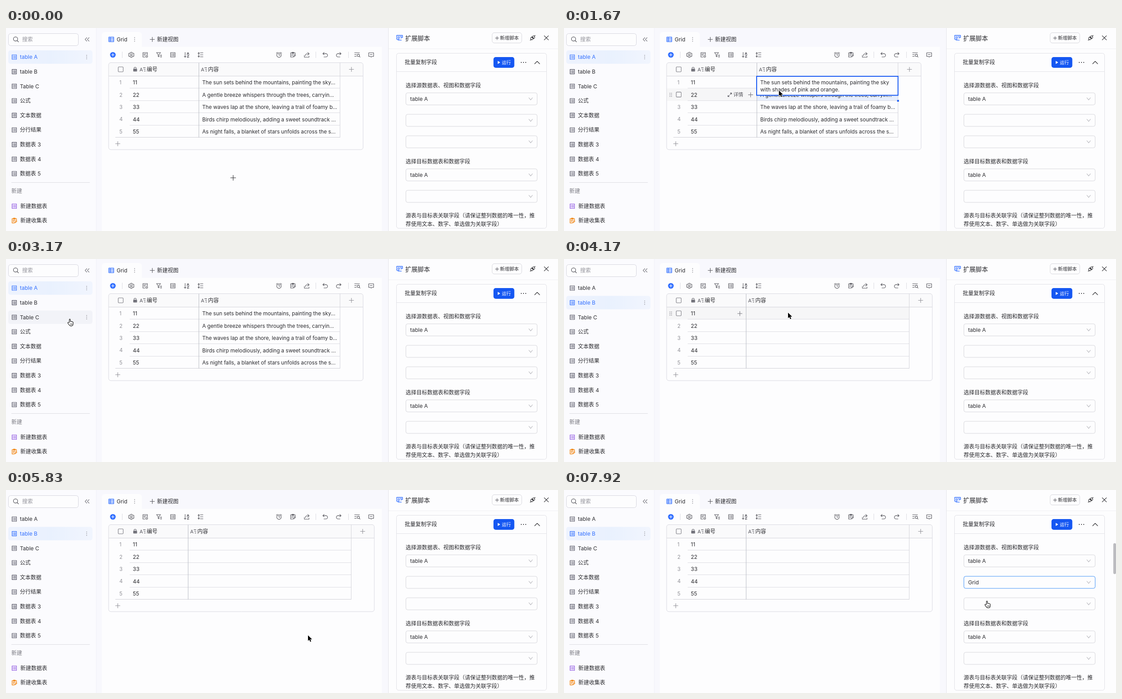
An HTML page with a canvas that plays this animation: 1232 by 454 pixels, repeating every 8000 ms.

```html
<!DOCTYPE html>
<html lang="zh-CN">
<head>
<meta charset="utf-8">
<title>Grid</title>
<style>
html, body { margin: 0; width: 100%; height: 100%; overflow: hidden; background: #fdfdfe; }
canvas { display: block; width: 1232px; height: 454px; }
</style>
</head>
<body>
<canvas id="stage"></canvas>
<script>
const W = 1232, H = 454, LOOP = 8000, STEP = 1000 / 12;
const canvas = document.getElementById('stage');
const ctx = canvas.getContext('2d');
const dpr = window.devicePixelRatio || 1;
canvas.width = W * dpr;
canvas.height = H * dpr;

const FONT = 'Inter, "Noto Sans CJK SC", "Noto Sans CJK", sans-serif';
const INK = '#2b2b2f', GREY = '#8f8f96', MID = '#55555c', LINE = '#dcdce2';
const BLUE = '#3370ff', DEEP = '#1557f2';
const ROW_TOP = 108, ROW_H = 27.4;

const ICONS = {
  list: 'M-5-5h10v10h-10zM-3.2-2.3h1M-.6-2.3h3.8M-3.2 0h1M-.6 0h3.8M-3.2 2.3h1M-.6 2.3h3.8',
  search: 'M4 -.5a4.7 4.7 0 1 1-9.4 0a4.7 4.7 0 1 1 9.4 0M2.8 3l3 3',
  fold: 'M-.5-4l-4 4 4 4M4.5-4l-4 4 4 4',
  grid: 'M-5.5-5h11v10h-11zM-5.5-1.8h11M-5.5 1.6h11M-2-5v10',
  plus: 'M-5 0h10M0-5v10',
  gear: 'M-1.2-5.8h2.4l.6 1.6 1.5.8 1.7-.3 1.1 2-1.1 1.7 1.1 1.7-1.1 2-1.7-.3-1.5.8-.6 1.6h-2.4l-.6-1.6-1.5-.8-1.7.3-1.1-2 1.1-1.7-1.1-1.7 1.1-2 1.7.3 1.5-.8zM2 0a2 2 0 1 1-4 0a2 2 0 1 1 4 0',
  form: 'M5 0v-5h-10v10h5M-3-2.2h6M-3 .4h3M5.5 3.3a2 2 0 1 1-4 0a2 2 0 1 1 4 0',
  filter: 'M-5.5-5h9l-3.5 4.5v5l-2-1v-4zM3 .5h3M3 2.7h3M3 5h3',
  sort: 'M-3.5-5.5v11M-5.5 3.3l2 2.2 2-2.2M.7-.7l2.2-4.8 2.2 4.8M1.4-2.4h3M1 1h4l-4 4.4h4',
  height: 'M-.5-4.5h6M-.5 0h6M-.5 4.5h6M-4-5v10M-5.8-3.2l1.8-1.9 1.8 1.9M-5.8 3.2l1.8 1.9 1.8-1.9',
  alarm: 'M5 .6a5 5 0 1 1-10 0a5 5 0 1 1 10 0M0-2.4v3.2h2.4M-5.8-3.6l2.4-2M5.8-3.6l-2.4-2',
  clip: 'M5-.5v-4h-10v9.5h5M-2-5.8h4v2.2h-4zM-3-1h5M-3 1.5h2.5M1 4.7l.3-1.8 3.2-3.2 1.4 1.4-3.2 3.2z',
  share: 'M2-5.3l3.4 3-3.4 3M5-2.3h-4c-3 0-4 2-4 4M-5.4 1v4.2h10.4v-2.5',
  undo: 'M-2.4-5.4l-3 2.8 3 2.8M-5-2.6h6.5a3.7 3.7 0 0 1 0 7.4h-4.5',
  redo: 'M2.4-5.4l3 2.8-3 2.8M5-2.6h-6.5a3.7 3.7 0 0 0 0 7.4h4.5',
  find: 'M-6-4.5h11M-6-.5h4M-6 3.5h4M5 1.2a2.6 2.6 0 1 1-5.2 0a2.6 2.6 0 1 1 5.2 0M4.3 3.2l2 2',
  comment: 'M-5.5-4.5h11v8h-4l-1.5 1.7-1.5-1.7h-4zM-2.5-.5h5',
  script: 'M-1 3.5h-5.5v-8.500h13v5M-2-2.700l-2 2 2 2M1-2.700l-1.500 4M3-2.700l2 2-2 2M-4 5.700h8',
  plug: 'M-5.500 5.500l2-2M-3.500 3.500c-2.500-2-.5-4 1-5.500l4 4c-1.500 1.500-3 3.500-5 1.500M5.500-5.500l-2 2M3.500-3.500c2.500 2 .5 4-.6 5l-4-4c1.100-1.500 2.600-3 4.600-1M-1 .5l1.600-1.600',
  close: 'M-4.700-4.700l9.400 9.400M4.700-4.700l-9.400 9.400',
  up: 'M-5.500 3l5.500-5.500 5.500 5.500',
  down: 'M-4-2.500l4 4.800 4-4.800',
  expand: 'M1-1l3.500-3.500M1.500-4.500h3v3M-1 1l-3.500 3.500M-4.500 1.500v3h3',
  bars: 'M0-4h5M1.500 0h3.500M2.500 4h2.500'
};
for (const name in ICONS) ICONS[name] = new Path2D(ICONS[name]);

const ARROW = new Path2D('M0 0v12.500l2.900-2.700 2 4.600 2.200-1-2-4.400h4z');
const HAND = new Path2D('M-1.200 7V.6c0-1.700 2.300-1.700 2.300 0v4c.7-.6 2-.4 2.200.4.800-.5 1.900-.2 2.100.6.900-.4 2 .1 2 1.200v3.200c0 3-1.600 4.800-4.600 4.800-2.400 0-3.300-.8-4.300-2.400l-2.900-4c-.9-1.300.7-2.400 1.700-1.500z');
const HAND_LINES = new Path2D('M1.500 9v3.500M3.300 9v3.500M5.100 9v3.500');

const SIDEBAR = ['table A', 'table B', 'Table C', '公式', '文本数据', '分行结果', '数据表 3', '数据表 4', '数据表 5'];
const itemY = i => 65 + 32.6 * i;
const TEXTS = [
  'The sun sets behind the mountains, painting the sky...',
  'A gentle breeze whispers through the trees, carryin...',
  'The waves lap at the shore, leaving a trail of foamy b...',
  'Birds chirp melodiously, adding a sweet soundtrack ...',
  'As night falls, a blanket of stars unfolds across the s...'
];
const TABLE_A = { split: 430, end: 745, right: 797, texts: TEXTS, detail: true };
const TABLE_B = { split: 406, end: 770, right: 822, texts: [], detail: false };

// pointer path: step, x, y
const PATH = [
  [0, 507, 335], [1, 507, 335], [4, 448, 324], [5, 448, 324], [7, 453, 331],
  [13, 482, 110], [18, 482, 112], [25, 470, 252], [26, 470, 252], [29, 468, 293],
  [33, 468, 293], [40, 62, 96], [43, 62, 96], [50, 500, 120], [51, 501, 122],
  [53, 501, 122], [60, 500, 231], [63, 500, 231], [66, 605, 340], [69, 605, 340],
  [70, 674, 325], [79, 968, 209], [85, 968, 209], [89, 925, 240], [93, 925, 240],
  [95, 944, 249]
];

function pointerAt(n) {
  let i = 0;
  while (i < PATH.length - 2 && PATH[i + 1][0] <= n) i++;
  const [n0, x0, y0] = PATH[i], [n1, x1, y1] = PATH[i + 1];
  const p = Math.min(1, (n - n0) / (n1 - n0)), e = p * p * (3 - 2 * p);
  return { x: x0 + (x1 - x0) * e, y: y0 + (y1 - y0) * e };
}

function text(str, x, y, color = INK, size = 12, weight = 400) {
  ctx.font = `${weight} ${size}px ${FONT}`;
  ctx.fillStyle = color;
  ctx.fillText(str, x, y + size * 0.37);
}
function rect(x, y, w, h, color) {
  ctx.fillStyle = color;
  ctx.fillRect(x, y, w, h);
}
function box(x, y, w, h, r, fill, stroke, width = 1) {
  ctx.beginPath();
  ctx.roundRect(x, y, w, h, r);
  if (fill) { ctx.fillStyle = fill; ctx.fill(); }
  if (stroke) { ctx.strokeStyle = stroke; ctx.lineWidth = width; ctx.stroke(); }
}
function icon(name, x, y, color = MID, width = 1.1, scale = 1) {
  ctx.save();
  ctx.translate(x, y);
  ctx.scale(scale, scale);
  ctx.lineJoin = ctx.lineCap = 'round';
  ctx.strokeStyle = color;
  ctx.lineWidth = width / scale;
  ctx.stroke(ICONS[name]);
  ctx.restore();
}
function dots(x, y, dx, dy, color = MID, r = 0.9) {
  ctx.fillStyle = color;
  for (let i = -1; i <= 1; i++) {
    ctx.beginPath();
    ctx.arc(x + i * dx, y + i * dy, r, 0, 7);
    ctx.fill();
  }
}

function drawSidebar(active, hover) {
  rect(0, 0, 201, H, '#fbfbfe');
  box(5.5, 12.5, 156, 27, 5, '#fdfdfe', '#d5d5de');
  icon('search', 22, 25, MID, 1.2);
  text('搜索', 36, 25.500, '#94949c');
  icon('fold', 181, 25.500, '#77777f');
  SIDEBAR.forEach((name, i) => {
    const y = itemY(i), on = i === active;
    if (on) {
      const g = ctx.createLinearGradient(5, 0, 193, 0);
      g.addColorStop(0, '#eef3fe');
      g.addColorStop(0.5, '#e9f1fe');
      g.addColorStop(1, '#f1f5fe');
      box(5, y - 15, 188, 30, 5, g);
    } else if (i === hover) box(5, y - 15, 188, 30, 5, '#f2f3f8');
    icon('list', 18.5, y, on ? BLUE : '#50505f');
    text(name, 31, y, on ? BLUE : INK);
    if (on || i === hover) dots(180, y, 0, 3.8, GREY);
  });
  rect(12, 345, 175, 1, LINE);
  text('新建', 12, 365, '#7a7a82');
  icon('list', 18.500, 398.500, '#8a4fe0');
  text('新建数据表', 32, 398.500);
  icon('clip', 18.500, 431, '#f28a1c', 1.3);
  text('新建收集表', 32, 431);
}

function drawToolbar() {
  rect(201, 0, 652, H, '#f8f8fd');
  rect(214, 42, 625, H - 42, '#fdfdfe');
  box(214, 9, 89, 40, [6, 6, 0, 0], '#fdfdfe');
  icon('grid', 235, 25.500, BLUE, 1.3);
  text('Grid', 247, 25.500, INK);
  dots(287, 25.500, 0, 4, GREY);
  icon('plus', 326.500, 25.500, MID);
  text('新建视图', 337, 25.500, INK);
  ctx.fillStyle = BLUE;
  ctx.beginPath();
  ctx.arc(238.500, 60, 6.3, 0, 7);
  ctx.fill();
  icon('plus', 238.500, 60, '#fff', 1.2, 0.6);
  [259, 691, 764].forEach(x => rect(x, 53, 1, 14, LINE));
  ['gear', 'form', 'filter', 'list', 'sort', 'height'].forEach((name, i) => icon(name, 279.700 + 30.900 * i, 60));
  ['alarm', 'clip', 'share'].forEach((name, i) => icon(name, 609.300 + 31 * i, 60));
  icon('undo', 712.500, 60);
  icon('redo', 742.500, 60);
  icon('find', 784, 60);
  icon('comment', 815, 60);
}

function fieldHead(label, x) {
  text('A', x, 92.500, MID, 11);
  icon('bars', x + 8.500, 92.500, MID, 1.1, 0.9);
  text(label, x + 16, 92.500);
}
function checkbox(y) {
  box(250.500, y - 5.500, 11, 11, 1.500, '#fdfdfe', '#77777f', 1.1);
}

function drawTable(t, hover, selEnd) {
  const { split, end, right } = t, bottom = ROW_TOP + 5 * ROW_H;
  box(229, 77.500, right - 229, 194.500, 5, '#fdfdfe');
  box(229, 77.500, right - 229, 30, [5, 5, 0, 0], '#fafafb');
  if (hover === 5) rect(229, 245, end - 229, 27, '#f6f6f8');

  for (let i = 0; i < 5; i++) {
    const top = ROW_TOP + i * ROW_H, y = top + 14;
    if (hover === i) rect(229, top, end - 229, ROW_H, '#f6f6f7');
    if (selEnd >= i) rect(split + 1, top, end - split - 1, ROW_H, '#e6eefd');
    if (hover === i) {
      for (const x of [236.500, 240]) dots(x, y, 0, 3.5, GREY, 0.95);
      checkbox(y - 0.500);
      icon('plus', split - 13.500, y, '#77777f');
      if (t.detail) {
        icon('expand', 370, y, MID, 1.1, 0.9);
        text('详情', 378, y, MID, 11);
      }
    } else text(String(i + 1), 253, y, GREY, 11.500);
    text(String(i + 1).repeat(2), 283, y, INK);
    if (t.texts[i]) text(t.texts[i], 438, y, INK, 11.7);
    const last = i === 4;
    rect(last ? 244 : 276, Math.round(top + ROW_H) - 1, end - (last ? 244 : 276), 1, last ? '#cfcfd6' : LINE);
  }

  rect(229, 107, right - 229, 1, '#d4d4da');
  rect(split, 78, 1, bottom - 78, '#b9bcc4');
  rect(end, 78, 1, bottom - 78, '#d4d4da');
  box(229, 77.500, right - 229, 194.500, 5, null, '#d8d8e0');
  checkbox(92.500);
  box(284, 91, 8.500, 6.300, 1, '#74747c');
  ctx.strokeStyle = '#74747c';
  ctx.lineWidth = 1.200;
  ctx.beginPath();
  ctx.arc(288.200, 90.500, 2.600, Math.PI, 0);
  ctx.stroke();
  fieldHead('编号', 298);
  fieldHead('内容', split + 5);
  icon('plus', right - 26, 92.500, GREY);
  icon('plus', 249.500, 258.800, GREY);

  if (selEnd >= 0) {
    const lines = t.texts.length ? ['The sun sets behind the mountains, painting the sky', 'with shades of pink and orange.'] : [];
    box(split, 108, end - split + 0.500, lines.length ? 42.500 : ROW_H - 0.500, 0, '#fdfdfe', DEEP, 2);
    lines.forEach((line, i) => text(line, 438, 121.500 + 16.500 * i, INK, 11.7));
    const y = ROW_TOP + (selEnd + 1) * ROW_H - 2;
    rect(end - 2, y - 0.500, 5, 5, '#fff');
    rect(end - 1.500, y, 4, 4, DEEP);
  }
}

function drawSelect(y, value, focus) {
  box(892.500, y - 13.500, 293, 27, 4, '#fdfdfe', focus ? '#3f91f7' : '#d6d6db');
  if (value) text(value, 902, y, INK);
  icon('down', 1171, y, '#b4b4ba');
}

function drawPanel(n, bright) {
  rect(853, 0, W - 853, H, '#fdfdfe');
  rect(853, 0, 1, H, '#e4e4ea');
  rect(854, 46, W - 854, 1, '#efeff3');
  icon('script', 878.500, 21.500, BLUE, 1.3);
  text('扩展脚本', 891, 22.500, INK, 13.8, 500);
  box(1085, 10.500, 66, 23, 5, '#fdfdfe', '#d6d6dc');
  icon('plus', 1096, 22.500, MID, 1.1, 0.75);
  text('新增脚本', 1102.500, 22.500, INK, 10.5);
  icon('plug', 1175.500, 22, INK);
  icon('close', 1206, 22, INK, 1.2);

  box(871.500, 56.500, 335, 391.500, 5, '#fdfdfe', '#dfdfe5');
  rect(872, 97, 334, 1, '#e2e2e7');
  text('批量复制字段', 890, 77, INK, 12, 500);
  box(1088, 65, 46.500, 24, 5, bright ? BLUE : DEEP);
  ctx.fillStyle = '#fff';
  ctx.fill(new Path2D('M1097.500 73.500l5.500 3.500-5.500 3.500z'));
  text('运行', 1106.500, 77.300, '#fff', 10.3);
  dots(1155, 77, 5, 0, INK, 1.1);
  icon('up', 1185.500, 77, INK, 1.2);

  text('选择源数据表、视图和数据字段', 892, 128.500);
  drawSelect(158.500, 'table A');
  drawSelect(206.500, n >= 91 ? 'Grid' : '', n >= 80);
  drawSelect(254.500, '');
  text('选择目标数据表和数据字段', 892, 298.500);
  drawSelect(328.500, 'table A');
  drawSelect(376.500, '');
  text('源表与目标表关联字段（请保证整列数据的唯一性，推', 892, 420);
  text('荐使用文本、数字、单选做为关联字段）', 892, 439);
}

function menuOpen(n) {
  if (n < 85 || n > 94) return 0;
  return n < 92 ? Math.min(1, 0.35 + (n - 85) * 0.4) : 0.75 - (n - 92) * 0.3;
}
function drawMenu(open, hover) {
  ctx.save();
  ctx.globalAlpha = open;
  ctx.translate(0, 223);
  ctx.scale(1, 0.7 + 0.3 * open);
  ctx.shadowColor = 'rgba(0,0,0,.14)';
  ctx.shadowBlur = 12 * dpr;
  ctx.shadowOffsetY = 3 * dpr;
  box(892, 0, 294, 40, 4, '#fdfdfe');
  ctx.shadowColor = 'transparent';
  if (hover) rect(892, 5, 294, 30, '#f4f5f8');
  text('Grid', 906, 20, INK);
  ctx.restore();
}

function drawPointer(kind, x, y) {
  ctx.save();
  ctx.translate(x, y);
  ctx.lineJoin = 'round';
  if (kind === 'cross') icon('plus', 0, 0, INK, 1.1, 1.15);
  else if (kind === 'arrow') {
    ctx.strokeStyle = '#fff';
    ctx.lineWidth = 2;
    ctx.stroke(ARROW);
    ctx.fillStyle = '#000';
    ctx.fill(ARROW);
  } else {
    ctx.fillStyle = '#fff';
    ctx.fill(HAND);
    ctx.strokeStyle = '#111';
    ctx.lineWidth = 1.1;
    ctx.stroke(HAND);
    ctx.lineWidth = 0.7;
    ctx.stroke(HAND_LINES);
  }
  ctx.restore();
}

function draw(time) {
  const n = Math.floor((time + 5) / STEP);
  const { x, y } = pointerAt(n);
  const second = n >= 44;
  const table = second ? TABLE_B : TABLE_A;
  const overTable = n > 6 && x > 229 && x < table.end && y >= ROW_TOP && y < 272;
  const row = Math.floor((y - ROW_TOP) / ROW_H);
  const sideItem = x < 193 ? Math.round((y - 65) / 32.6) : -1;

  let selEnd = -1;
  if (n >= 17 && n < 31) selEnd = n < 24 ? Math.max(0, Math.min(4, row)) : 4;
  if (n >= 54 && n < 65) selEnd = n < 60 ? Math.max(0, Math.min(4, row)) : 4;

  ctx.setTransform(dpr, 0, 0, dpr, 0, 0);
  drawToolbar();
  drawSidebar(second ? 1 : 0, sideItem);
  rect(201, 0, 1, H, '#f1f1f7');
  if (Math.abs(x - 207) < 16) rect(200, 0, 2, H, BLUE);
  drawTable(table, overTable ? row : -1, selEnd);
  drawPanel(n, n >= 7 && n < 17);
  if (n >= 70 && x > 853) box(1226, 119, 6, 69, 3, '#bcbcc0');
  const open = menuOpen(n);
  if (open) drawMenu(open, y > 226);

  const overSelect = x > 892 && x < 1186 && y > 192 && y < 270;
  const kind = n <= 6 ? 'cross' : sideItem >= 0 || overSelect ? 'hand' : 'arrow';
  drawPointer(kind, x, y);
}

let start;
function tick(now) {
  if (start === undefined) start = now;
  draw((now - start) % LOOP);
  requestAnimationFrame(tick);
}
draw(0);
requestAnimationFrame(tick);
</script>
</body>
</html>
```
